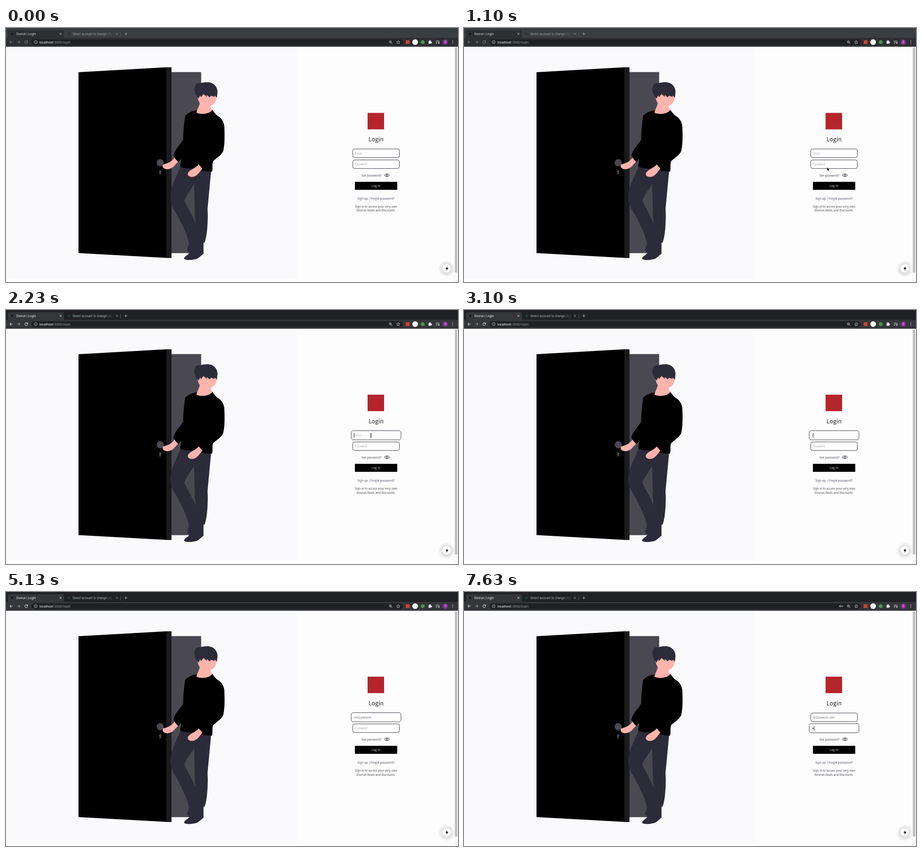
Recreate the animation shown at these times as an HTML page with a canvas. Size 960x540 px, loop 8000 ms.

```html
<!DOCTYPE html>
<html lang="en">
<head>
<meta charset="utf-8">
<title>Login</title>
<style>
html, body { margin: 0; width: 100%; height: 100%; overflow: hidden; background: #fdfdfd; }
canvas { display: block; width: 100vw; height: 100vh; }
</style>
</head>
<body>
<canvas id="stage" width="960" height="540"></canvas>
<script>
const ctx = document.getElementById('stage').getContext('2d');
const LOOP = 8000;
const UI = 'Roboto, "Noto Sans", sans-serif';
const PAGE = '"Noto Sans CJK JP", "Noto Sans CJK SC", "Noto Sans CJK", "Noto Sans", sans-serif';
const NAVY = '#2c2b39', GREY = '#4a4952', SKIN = '#ffb3ad', INK = '#48474f';
const MID = 786;

const WINDOW_ACTIVE = 1500, EMAIL_FOCUS = 1970, PASS_FOCUS = 7000, GROW = 300;
const PASS_KEYS = [7500, 7630];
const CARET_OFF = [[2470, 2970], [5100, 5500]];
// '<' is a backspace
const KEYS = 'ra52@wunnil.com<<<<<<<il.com';
const KEY_TIMES = [
  2970, 3130, 3270, 3430, 3670, 4000, 4070, 4130, 4190, 4250, 4310, 4370, 4430, 4490, 4540,
  4600, 4870, 4970, 5050, 5130, 5770, 5870, 6030, 6200, 6370, 6450, 6530, 6630
];

const clamp = v => Math.max(0, Math.min(1, v));
const ease = v => { v = clamp(v); return v * v * (3 - 2 * v); };
const easeOut = v => 1 - (1 - clamp(v)) ** 2.5;
const mix = (a, b, k) => a + (b - a) * k;

function rect(x, y, w, h, color) {
  ctx.fillStyle = color;
  ctx.fillRect(x, y, w, h);
}

function round(x, y, w, h, r, color) {
  ctx.beginPath();
  ctx.roundRect(x, y, w, h, r);
  ctx.fillStyle = color;
  ctx.fill();
}

function disc(x, y, r, color) {
  ctx.beginPath();
  ctx.arc(x, y, r, 0, 7);
  ctx.fillStyle = color;
  ctx.fill();
}

function shape(d, color) {
  ctx.fillStyle = color;
  ctx.fill(new Path2D(d));
}

function line(d, color, width = 1) {
  ctx.strokeStyle = color;
  ctx.lineWidth = width;
  ctx.stroke(new Path2D(d));
}

function text(s, x, y, size, color, o = {}) {
  ctx.font = `${o.weight || 400} ${size}px ${o.font || PAGE}`;
  ctx.textAlign = o.align || 'left';
  ctx.letterSpacing = (o.space || 0) + 'px';
  ctx.fillStyle = color;
  ctx.fillText(s, x, y);
  return ctx.measureText(s).width;
}

function at(x, y, draw) {
  ctx.save();
  ctx.translate(x, y);
  draw();
  ctx.restore();
}

function typed(t) {
  let s = '';
  for (let i = 0; i < KEYS.length && KEY_TIMES[i] <= t; i++) {
    s = KEYS[i] === '<' ? s.slice(0, -1) : s + KEYS[i];
  }
  return s;
}

function tabs(active) {
  const strip = active ? '#202124' : '#393e41';
  const bar = active ? '#35363a' : '#2e2f33';
  const title = active ? '#f1f1f3' : '#d4d5d8';
  const dim = active ? '#b0b2b6' : '#9a9da1';
  rect(0, 0, 960, 21, strip);
  rect(0, 21, 960, 19, bar);
  round(4, 4.5, 119, 17, [4, 4, 0, 0], bar);
  disc(13, 12.5, 2, '#0c0c0e');
  text('Dovrun | Login', 22, 15, 6.5, title, { font: UI });
  disc(133, 12.5, 3, active ? '#21392f' : '#3a3030');

  const fade = ctx.createLinearGradient(212, 0, 229, 0);
  fade.addColorStop(0, dim);
  fade.addColorStop(1, strip);
  text('Select account to change | Dja', 141, 15, 6.5, fade, { font: UI });

  const cross = 'M-2-2 2 2M2-2-2 2';
  at(115.8, 12.5, () => line(cross, title, 0.9));
  at(235.5, 12.5, () => line(cross, dim, 0.9));
  rect(243, 8, 0.8, 10, '#5f6267');
  at(254.5, 12.5, () => line('M-3 0H3M0-3V3', dim, 1));
}

function toolbar(active, keyIcon) {
  const bright = active ? '#eeeef0' : '#898b90';
  const soft = active ? '#a0a2a6' : '#898b90';
  const field = '#202124';
  const arrow = 'M3.2 0H-3M0-3-3 0 0 3';
  at(11, 30, () => line(arrow, bright));
  at(27, 30, () => { ctx.scale(-1, 1); line(arrow, soft); });
  at(43, 30, () => {
    line('M2.6-1.6A3 3 0 1 0 3 .6', bright);
    shape('M3.3-3.5V-.3H.2Z', bright);
  });
  round(54, 24, 789, 12.5, 6.2, field);
  at(63, 30, () => {
    line('M3.2 0A3.2 3.2 0 1 1-3.2 0 3.2 3.2 0 1 1 3.2 0Z', '#c6c7ca', 0.8);
    rect(-0.4, -0.5, 0.8, 2.3, '#c6c7ca');
    rect(-0.4, -1.8, 0.8, 0.8, '#c6c7ca');
  });
  const w = text('localhost', 71, 32.5, 7.2, '#f4f4f6', { font: UI });
  text(':3000/login', 71 + w, 32.5, 7.2, '#92959a', { font: UI });

  const icon = '#d0d1d4';
  if (keyIcon) at(801, 30, () => {
    line('M-.8 0A1.5 1.5 0 1 1-3.8 0 1.5 1.5 0 1 1-.8 0H4M2.7 0V2', icon, 1);
  });
  at(816.3, 29.5, () => {
    line('M2.3 0A2.3 2.3 0 1 1-2.3 0 2.3 2.3 0 1 1 2.3 0ZM1.7 1.7 4 4M-1.1 0H1.1', icon, 0.9);
  });
  at(833, 30, () => {
    line('M0-3.4 1-1 3.5-.8 1.6.9 2.2 3.3 0 2-2.2 3.3-1.6.9-3.5-.8-1-1Z', icon, 0.8);
  });
  rect(849, 26, 8, 8, '#d0402c');
  disc(869, 30, 6, '#fbfbf6');
  disc(885, 30, 4, '#3f9a4c');
  at(901, 30, () => {
    rect(-3.5, -2.2, 5.6, 5.6, '#e8e8ea');
    disc(-0.5, -2.6, 1.4, '#e8e8ea');
    disc(2.5, 0.7, 1.4, '#e8e8ea');
  });
  at(917, 30, () => {
    line('M-4-2.5H2M-4 0H2M-4 2.5H-1M3.2-2.5V2', icon, 0.9);
    disc(2.2, 2.3, 1.2, icon);
  });
  disc(933, 30, 5.6, '#8c2d9c');
  text('S', 933, 32.3, 6.5, '#f4dcf4', { font: UI, align: 'center' });
  for (const y of [-2.6, 0, 2.6]) disc(949, 30 + y, 0.8, icon);
  rect(0, 39, 960, 1, '#505155');
}

function scene() {
  rect(351, 93.7, 63.5, 385, GREY);
  shape('M154 94 341 83.5V488.7L154 478.5Z', '#000');
  rect(340.5, 83.5, 11, 405.5, '#1b1b1d');
  disc(327.5, 286.3, 7.6, GREY);
  disc(327.5, 305, 2.5, GREY);
  shape('M326.8 305H328.3L330 311H325Z', GREY);

  // trousers with the gap between the legs, then the shoe
  shape('M372 290C366 310 349 335 349 361C350 378 358 388 364 398C373 417 385 437 389 460' +
    'L413 458 422 456C427 442 428 421 428.5 404C429 396 428 389 428 385L436 300Z', NAVY);
  shape('M399 332C393 344 383 355 379 366C380 374 396 396 402.5 416C400 390 401 355 399 332Z', GREY);
  shape('M389 456C389 463 385 467 384.5 472C386 475 390 476 389 479C384 484 377 487 378.5 491' +
    'C383 495 400 493 407 490C413 486 416 482 419.5 480V454Z', NAVY);

  shape('M358 275C353 284 343 288 334 290C331 293 333 298 338 299.5C347 302 355 297 360 290L367 283Z', SKIN);
  shape('M406 175C395 176 385 181 380.5 187C378 205 376 222 376.5 237C369 249 358 259 355.5 271' +
    'C358 277 362 281 366 285L372 278C373 284 369 290 370.5 295C382 300 396 298 409 300' +
    'L420 304 437.5 305.5C440 297 437 291 440 283C448 276 459 269 461.5 261C465 246 464.5 224 463.5 207' +
    'C461 195 455 190 450 187C444 183 441 177 437 173Z', '#000');
  shape('M409.5 290C404 297 392 300 386.5 308C384.5 314 390 317 396 316.5C406 316 411 306 417 299Z', SKIN);

  shape('M412 156C411 168 406 171 404.5 180C414 184.5 430 183.5 438 175C434 170 434 164 436 157Z', SKIN);
  shape('M406 137C406 143 407 153 411 159C418 166 431 167 438 164C445 160 447 152 448 146L447 132Z', SKIN);
  shape('M409 150C405 144 401 141 401 135C398 130 401 126 402 123C402 118 407 117 412 117.5' +
    'C419 115 430 114 437 117C446 121 450 130 449 138L448 148C446 146 445 145 443 143.5' +
    'L443 146.5 435.5 144 432.5 147.5 426.5 142 427 146.5 419.5 140.5 414 147 412.5 143Z', NAVY);
}

function caretOn(t) {
  return !CARET_OFF.some(([a, b]) => t >= a && t < b);
}

function input(y, grow, content, hint, caret) {
  const k = mix(1, 1.067, grow);
  const size = 5.85 * k, x = mix(741, 739, grow);
  const w = 99 * k, h = 18.2 * k;
  ctx.beginPath();
  ctx.roundRect(MID - w / 2, y - h / 2, w, h, 4 * k);
  ctx.fillStyle = '#fff';
  ctx.fill();
  ctx.strokeStyle = NAVY;
  ctx.lineWidth = 0.9;
  ctx.stroke();
  const dots = content[0] === '•';
  let end = 0;
  if (dots) {
    for (let i = 0; i < content.length; i++) disc(740.2 + i * 2.2, y, 0.95, '#222226');
    end = content.length * 2.2 + 0.2;
  } else if (content) {
    end = text(content, x, y + 2.3 * k, size, '#67666e', { weight: 300 });
  } else {
    text(hint, x, y + 2.3 * k, size, '#a8a7ad', { weight: 300 });
  }
  if (caret) rect(x + end - 0.3, y - 4.8, 0.9, 9.8, '#111');
}

function form(t) {
  const first = easeOut((t - EMAIL_FOCUS) / GROW);
  const second = easeOut((t - PASS_FOCUS) / GROW);
  const push = first * 0.5;
  const para = { align: 'center', weight: 300 };
  rect(768, 180.5 - push, 35, 35, '#b6252c');
  text('Login', MID, 241.2 - push / 2, 12.4, '#242428', para);

  const onEmail = t >= EMAIL_FOCUS && t < PASS_FOCUS;
  const onPass = t >= PASS_FOCUS;
  const dots = '•'.repeat(PASS_KEYS.filter(k => k <= t).length);
  input(266.3, first * (1 - second), typed(t), 'Email', onEmail && caretOn(t));
  input(289.6, second, dots, 'Password', onPass && caretOn(t));

  text('See password?', 755, 315.6, 6.2, INK, { weight: 300 });
  at(809, 313, () => {
    line('M-5.5 0C-3-4 3-4 5.5 0C3 4-3 4-5.5 0Z', NAVY, 1);
    line('M1.8 0A1.8 1.8 0 1 1-1.8 0 1.8 1.8 0 1 1 1.8 0Z', NAVY, 1);
  });
  rect(741, 327, 90, 17, '#000');
  text('Log In', MID, 337.8 + push / 2, 5.9, '#eeeef0', { align: 'center', space: 0.3 });
  text('Sign up. | Forgot password?', MID, 365.4, 6.25, '#504f68', para);
  text('Sign in to access your very own', MID, 381.5 + push, 6.25, INK, para);
  text('Dovrun Deals and Discounts.', MID, 390.3 + push, 6.25, INK, para);
}

function page(t) {
  rect(0, 40, 617, 500, '#fafafc');
  rect(617, 40, 335, 500, '#fdfdfd');
  rect(0, 533, 952, 7, '#fdfdfd');
  scene();
  form(t);

  const glow = ctx.createRadialGradient(936, 512, 7, 936, 512, 18);
  glow.addColorStop(0, 'rgba(0,0,0,.16)');
  glow.addColorStop(1, 'rgba(0,0,0,0)');
  disc(936, 512, 18, glow);
  disc(936, 511, 9, '#fdfdfd');
  at(936.5, 511.3, () => shape('M1-4.5-3 .8H-.5L-1.2 4.5 3-1H.4Z', '#000'));

  rect(952, 40, 8, 500, '#f8f8f8');
  round(953.3, 41, 5.2, 479, 2.6, '#bfbfc1');
}

function pointer(t) {
  if (t < 30 || t >= KEY_TIMES[0]) return;
  const a = ease((t - 30) / 1070), b = ease((t - 1100) / 600);
  const x = mix(mix(800, 771.3, a), 775, b);
  const y = mix(mix(-10, 296.5, a), 267, b);
  at(x, y, () => {
    if (t >= WINDOW_ACTIVE) {
      line('M-1.7-4Q0-4 0-3V3Q0 4 1.7 4M1.7-4Q0-4 0-3V3Q0 4-1.7 4', '#111', 0.9);
      return;
    }
    const d = 'M0 0V6.6L1.5 5.2 2.6 7.6 3.8 7 2.8 4.8H4.8Z';
    line(d, '#fff', 1);
    shape(d, '#0a0a0a');
  });
}

function frame(now) {
  const t = now % LOOP;
  const active = t >= WINDOW_ACTIVE;
  page(t);
  tabs(active);
  toolbar(active, t >= PASS_KEYS[0]);
  pointer(t);
  requestAnimationFrame(frame);
}
requestAnimationFrame(frame);
</script>
</body>
</html>
```
